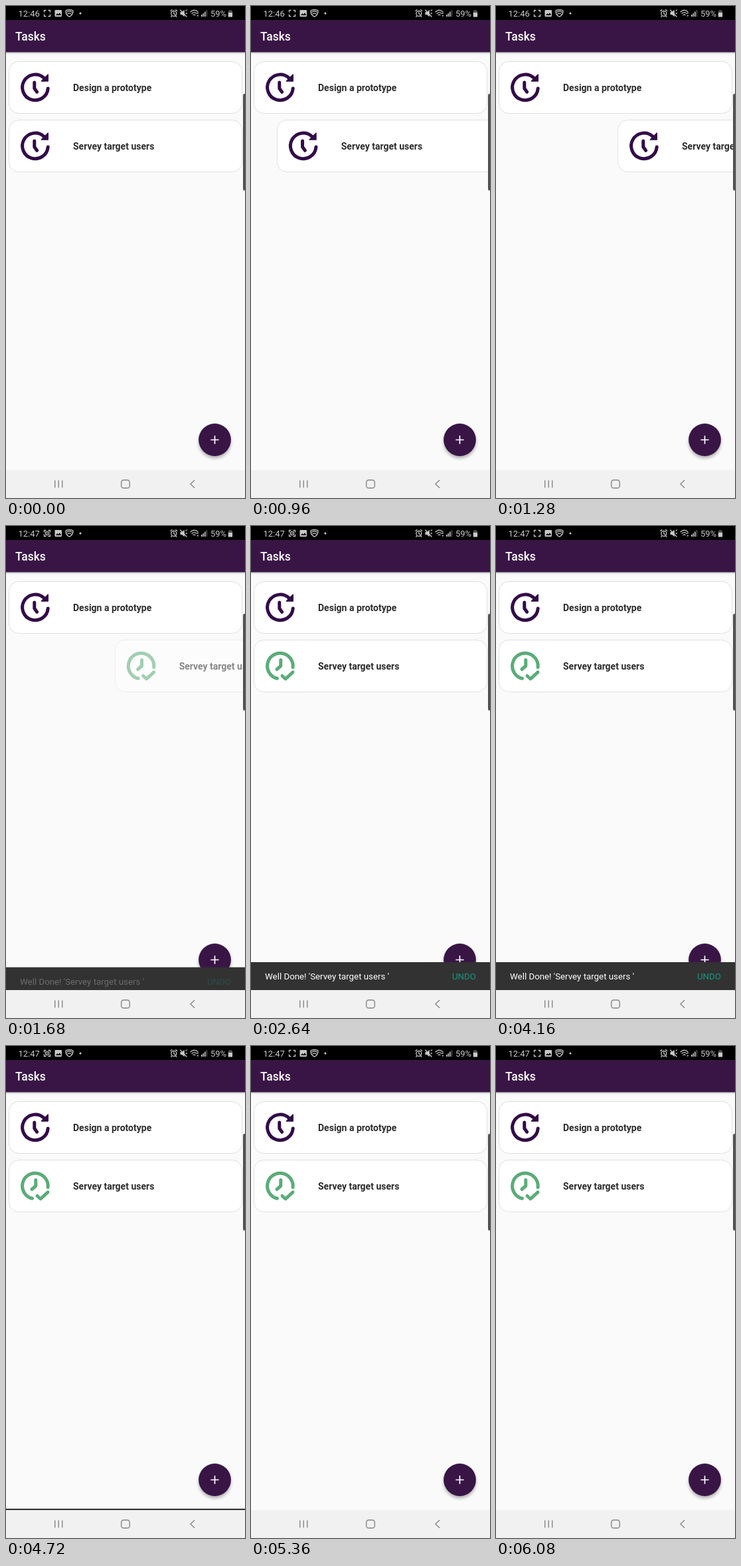
Write an HTML page that moves like this. It is 360 px wide and 740 px high and loops after 6160 ms.

```html
<!DOCTYPE html>
<html lang="en">
<head>
<meta charset="utf-8">
<title>Tasks</title>
<style>
  html, body { margin: 0; width: 100%; height: 100%; overflow: hidden; background: #fafafa; }
  svg { display: block; width: 360px; height: 740px; font-family: Roboto, sans-serif; }
  .line { fill: none; stroke-linecap: round; stroke-linejoin: round; }
  .card rect { fill: #fff; stroke: #e0e0e0; }
  .card text { font-size: 14px; font-weight: 700; fill: #2c2c2c; }
  .status { font-size: 13px; fill: #c8c8c8; }
  .status .line { stroke: #c8c8c8; stroke-width: 1.3; }
  .snack { font-size: 13.3px; }
</style>
</head>
<body>
<svg viewBox="0 0 360 740">
  <defs>
    <linearGradient id="fade" x2="0" y2="1">
      <stop stop-opacity=".22"/><stop offset="1" stop-opacity="0"/>
    </linearGradient>
    <filter id="soft" x="-30%" y="-30%" width="160%" height="160%"><feGaussianBlur stdDeviation="2.6"/></filter>
    <g id="pending" class="line" stroke="#320c48" stroke-width="5">
      <path d="M63.2 41A19.3 19.3 0 1 1 57 25.2"/>
      <path d="M42.8 32V41L46.6 46.3"/>
      <path d="M63.2 20.2V30H53.4Z" fill="#320c48" stroke-width="1.6"/>
    </g>
    <g id="done" class="line" stroke="#5bac79" stroke-width="5">
      <path d="M39.5 58.3A19.3 19.3 0 1 1 63.1 41.5"/>
      <path d="M44.8 30.5V39.5L39 44.5"/>
      <path d="M47 54.5L52 59L63 48.8"/>
    </g>
  </defs>

  <rect width="360" height="740" fill="#fafafa"/>

  <g class="card" transform="translate(0 83)">
    <rect x="4.5" y=".5" width="351" height="78" rx="15"/>
    <use href="#pending"/>
    <text x="101" y="45">Design a prototype</text>
  </g>
  <g class="card" id="swiped">
    <rect x="4.5" y=".5" width="351" height="78" rx="15"/>
    <use href="#pending" id="swipedIcon"/>
    <text x="101" y="45">Servey target users</text>
  </g>

  <circle cx="314.5" cy="656" r="24" opacity=".32" filter="url(#soft)"/>
  <circle cx="314.5" cy="652.5" r="24.4" fill="#391546"/>
  <path d="M308.3 652.5h12.4M314.5 646.3v12.4" stroke="#fff" stroke-width="1.7"/>

  <g class="snack" id="snack">
    <rect y="656" width="360" height="43" fill="#323232"/>
    <g id="snackText">
      <text x="21" y="682" fill="#fff">Well Done! 'Servey target users '</text>
      <text x="303" y="682" fill="#169781">UNDO</text>
    </g>
  </g>

  <rect y="69" width="360" height="4" fill="url(#fade)"/>
  <rect y="21" width="360" height="48.5" fill="#391546"/>
  <text x="14" y="52" font-size="17.5" font-weight="500" fill="#fff">Tasks</text>

  <rect width="360" height="21" fill="#000"/>
  <g class="status">
    <text x="18.5" y="16" id="clock"></text>
    <path class="line" d="M57.5 9V6.5H60M64 6.5h2.5V9M66.5 13v2.5H64M60 15.5H57.5V13"/>
    <g id="capture">
      <rect x="59.5" y="8.7" width="5" height="4.6" rx="1" class="line"/>
      <circle cx="62" cy="11" r=".9"/>
    </g>
    <rect x="73.5" y="6" width="10.5" height="10" rx="1.2"/>
    <path d="M75 14l2.4-3 1.6 1.8 2-2.7 2.2 3.9z" fill="#000"/>
    <path class="line" d="M90 7Q95.5 4.5 101 7Q101.5 13 95.5 16.3Q89.5 13 90 7ZM91.5 9.3q4-2.2 8 0M93 11.8q2.5-1.5 5 0"/>
    <circle cx="112" cy="11" r="1.6"/>

    <circle cx="252.8" cy="11.3" r="4" class="line"/>
    <path class="line" d="M252.8 9v2.6l1.8 1M248 7.4l2-1.8M257.6 7.4l-2-1.8M249.8 15l-1 1.2M255.8 15l1 1.2"/>
    <path d="M262.5 9h2.5l3.8-3.3v10.6L265 13h-2.5z"/>
    <path class="line" d="M262.5 6l9.5 10M271 7l1.5-1M271 11h1.5"/>
    <path class="line" d="M278 8.7q5.5-4.8 11 0M280 11.2q3.5-3 7 0M282 13.5q1.5-1.2 3 0"/>
    <path d="M287.2 11.5l1.6-2 1.6 2zM287.2 14l1.6 2 1.6-2z"/>
    <path d="M294 13h1.6v3H294zM296.5 11h1.6v5h-1.6zM299 8.5h1.6V16H299z"/>
    <path d="M301.6 6h1.6v10h-1.6z" opacity=".4"/>
    <text x="308" y="16">59%</text>
    <path d="M336.3 6h3.2v1.2h1.6V11h-6.4V7.2h1.6z" opacity=".4"/>
    <rect x="334.7" y="10" width="6.4" height="6.5" rx=".8"/>
  </g>

  <path d="M360 132h-1q-2 0-2 2.5v140.5q0 2.5 2 2.5h1z" fill="#505050"/>

  <rect y="698" width="360" height="42" fill="#f1f1f1"/>
  <g class="line" stroke="#858585" stroke-width="1.4">
    <path d="M73.7 713.5v11M79.2 713.5v11M84.7 713.5v11" stroke-linecap="butt"/>
    <rect x="173.7" y="713" width="12.6" height="12" rx="3.6"/>
    <path d="M283.7 713.6l-5.8 5.4 5.8 5.4"/>
  </g>
</svg>
<script>
const LOOP = 6160, SWIPE = 640, COMPLETE = 1547, DISMISS = 4540, ANIM = 250;
const el = id => document.getElementById(id);
const progress = (t, start, length) => Math.min(1, Math.max(0, (t - start) / length));
const easeInOut = p => (1 - Math.cos(Math.PI * p)) / 2;

// Cubic Bézier (.4, 0, .2, 1), solved by bisection.
function fastOutSlowIn(x) {
  let low = 0, high = 1;
  for (let i = 0; i < 20; i++) {
    const u = (low + high) / 2;
    if (1.2 * u * (1 - u) ** 2 + .6 * u * u * (1 - u) + u ** 3 < x) low = u; else high = u;
  }
  return low * low * (3 - 2 * low);
}

function render(t) {
  const done = t >= COMPLETE;
  const settle = easeInOut(progress(t, COMPLETE, ANIM));
  const drag = 34.5 * (Math.max(0, t - SWIPE) / 320) ** 2.37;
  const offset = done ? 360 * (1 - settle) : Math.min(360, drag);
  el('swiped').setAttribute('transform', `translate(${offset} 171)`);
  el('swiped').setAttribute('opacity', done ? settle : 1);
  el('swipedIcon').setAttribute('href', done ? '#done' : '#pending');

  const shown = fastOutSlowIn(progress(t, COMPLETE, ANIM)) - fastOutSlowIn(progress(t, DISMISS, ANIM));
  const textAlpha = easeInOut(progress(t, COMPLETE + 70, 180)) - easeInOut(progress(t, DISMISS, 180));
  el('snack').setAttribute('transform', `translate(0 ${42 * (1 - shown)})`);
  el('snack').setAttribute('visibility', shown > 0 ? 'visible' : 'hidden');
  el('snackText').setAttribute('opacity', textAlpha);

  el('clock').textContent = t < 1360 ? '12:46' : '12:47';
  const blink = t % 1000;
  el('capture').setAttribute('visibility', blink >= 400 && blink < 900 ? 'visible' : 'hidden');
}

const start = performance.now();
function tick() {
  render((performance.now() - start) % LOOP);
  requestAnimationFrame(tick);
}
tick();
</script>
</body>
</html>
```
